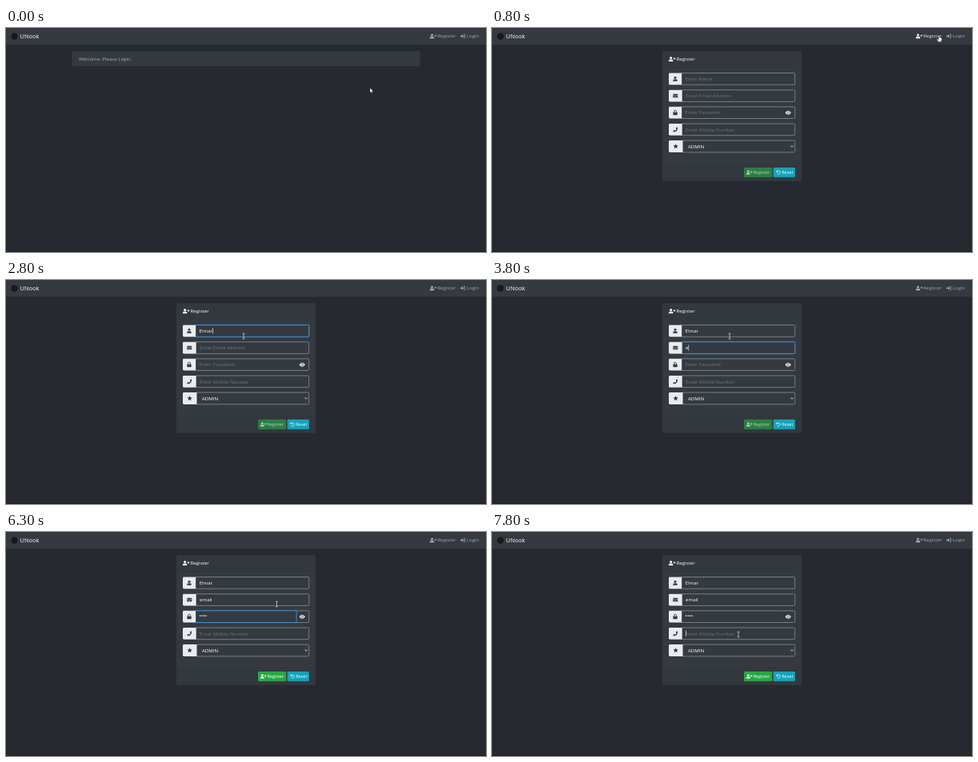
Recreate the animation shown at these times as an HTML page with a canvas. Size 600x281 px, loop 8 s.

```html
<!DOCTYPE html>
<html lang="en">
<head>
<meta charset="utf-8">
<title>Register</title>
<style>
html, body { margin: 0; width: 100%; height: 100%; overflow: hidden; background: #262a30; }
canvas { display: block; width: 600px; height: 281px; }
</style>
</head>
<body>
<canvas id="stage"></canvas>
<script>
const W = 600, H = 281, LOOP = 8000;
const canvas = document.getElementById('stage');
const ctx = canvas.getContext('2d');
const dpr = window.devicePixelRatio || 1;
canvas.width = W * dpr;
canvas.height = H * dpr;

const PANEL = '#343a40', LIGHT = '#e9ecef', MUTED = '#a0a4a8', DARK = '#343a40';

// Each entry changes only the listed parts of the state.
const START = {
  page: 'home', hover: '', cursor: ['arrow', 455, 75],
  name: '', email: '', password: '', focus: '', glow: 0, caret: false, ready: 0
};
const TIMELINE = [
  [300, { cursor: ['hand', 559, 9], hover: 'nav' }],
  [800, { page: 'form' }],
  [1300, { cursor: ['beam', 297, 70.5], hover: '', focus: 'name', glow: 0.5, caret: true }],
  [1500, { glow: 1 }],
  [1800, { name: 'E' }],
  [2000, { name: 'El' }],
  [2300, { name: 'Elm' }],
  [2500, { name: 'Elma' }],
  [2800, { name: 'Elmar' }],
  [3000, { focus: 'email', glow: 0.5 }],
  [3300, { glow: 1 }],
  [3800, { email: 'e' }],
  [4300, { email: 'ema' }],
  [4500, { email: 'email' }],
  [4800, { focus: 'password', glow: 0.5 }],
  [5000, { glow: 1 }],
  [5300, { password: '•', ready: 0.5 }],
  [5500, { password: '••', ready: 1 }],
  [5800, { password: '••••' }],
  [6300, { cursor: ['beam', 338.5, 90.5], caret: false }],
  [6500, { cursor: ['hand', 369, 108] }],
  [6800, { focus: '', glow: 0 }],
  [7500, { cursor: ['hand', 367, 178], hover: 'reset' }],
  [7800, { cursor: ['beam', 308, 128.5], hover: '', focus: 'mobile', caret: true }]
];

const FIELDS = [
  { id: 'name', icon: 'user', hint: 'Enter Name', x: 237, y: 56.5 },
  { id: 'email', icon: 'mail', hint: 'Enter Email Address', x: 237.5, y: 77.7 },
  { id: 'password', icon: 'lock', hint: 'Enter Password', x: 237, y: 98.8 },
  { id: 'mobile', icon: 'phone', hint: 'Enter Mobile Number', x: 237.5, y: 120 }
];

function stateAt(time) {
  return Object.assign({}, START, ...TIMELINE.filter(e => e[0] <= time).map(e => e[1]));
}

function box(x, y, w, h, r, fill, stroke, line = 0.6) {
  ctx.beginPath();
  ctx.roundRect(x, y, w, h, r);
  if (fill) { ctx.fillStyle = fill; ctx.fill(); }
  if (stroke) { ctx.strokeStyle = stroke; ctx.lineWidth = line; ctx.stroke(); }
}

function text(str, x, y, size, color) {
  ctx.font = `${size}px "Open Sans", "Noto Sans", sans-serif`;
  ctx.fillStyle = color;
  ctx.fillText(str, x, y);
  return ctx.measureText(str).width;
}

function poly(points, fill, stroke, line = 0.7) {
  ctx.beginPath();
  points.forEach(([x, y]) => ctx.lineTo(x, y));
  ctx.closePath();
  if (fill) { ctx.fillStyle = fill; ctx.fill(); }
  if (stroke) { ctx.strokeStyle = stroke; ctx.lineWidth = line; ctx.stroke(); }
}

function disc(x, y, r, fill) {
  ctx.beginPath();
  ctx.arc(x, y, r, 0, 7);
  ctx.fillStyle = fill;
  ctx.fill();
}

function path(d, color, line, fill) {
  const p = new Path2D(d);
  if (fill) { ctx.fillStyle = fill; ctx.fill(p); }
  if (line) { ctx.strokeStyle = color; ctx.lineWidth = line; ctx.stroke(p); }
}

// Icons are drawn around their own centre, about six pixels tall.
const icons = {
  user(c) {
    disc(0, -1.5, 1.5, c);
    box(-2.7, 0.4, 5.4, 2.6, [1.5, 1.5, 0.4, 0.4], c);
  },
  userPlus(c) {
    ctx.translate(-1.2, 0);
    icons.user(c);
    path('M3 -.6H5.8M4.4 -2V.8', c, 0.8);
  },
  mail(c) {
    box(-3, -2.3, 6, 4.6, 0.6, c);
    path('M-3 -1.2L0 .9L3 -1.2', LIGHT, 0.6);
  },
  lock(c) {
    box(-2.6, -0.4, 5.2, 3.5, 0.5, c);
    path('M-1.5 0V-1.4A1.5 1.5 0 0 1 1.5 -1.4V0', c, 0.9);
  },
  phone(c) {
    path('M2.8 -2.9L1.2 -2.5L.6 -1L1.4 -.4Q.8 .9 -.4 1.4L-1 .6L-2.5 1.2L-2.9 2.8Q3.2 3.3 2.8 -2.9Z', c, 0, c);
  },
  star(c) {
    poly(Array.from({ length: 10 }, (_, i) => {
      const r = i % 2 ? 1.6 : 3.3, a = i * Math.PI / 5;
      return [Math.sin(a) * r, -Math.cos(a) * r];
    }), c);
  },
  eye(c) {
    path('M-3.6 0Q0 -5 3.6 0Q0 5 -3.6 0Z', c, 0, c);
    disc(0, 0, 1.6, DARK);
    disc(0, 0, 1, c);
  },
  login(c) {
    path('M-3 -.8H-.9V-2.3L1.4 0L-.9 2.3V.8H-3Z', c, 0, c);
    path('M1 -2.1H2.6V2.1H1', c, 0.8);
  },
  undo(c) {
    path('M-1.8 -1.3A2.3 2.3 0 1 1 -1.6 1.7', c, 0.8);
    path('M-2.8 -2.8V-.4H-.4Z', c, 0, c);
  }
};

function icon(kind, x, y, color, scale = 1) {
  ctx.save();
  ctx.translate(x, y);
  ctx.scale(scale, scale);
  icons[kind](color);
  ctx.restore();
}

function drawNav(s) {
  box(0, 0, W, 21, 0, PANEL);
  disc(10.5, 10.5, 4.2, '#17191d');
  text('UNook', 17.5, 13, 7.4, '#ffffff');
  const active = s.hover === 'nav' ? '#e6e7e8' : MUTED;
  icon('userPlus', 533.7, 10.2, active);
  text('Register', 539.3, 12.4, 6.1, active);
  icon('login', 571, 10.2, MUTED);
  text('Login', 575.8, 12.4, 6.1, MUTED);
}

function drawHome() {
  box(82.5, 29, 435, 19, 1.2, PANEL);
  text('Welcome. Please Login.', 91, 41.3, 6.1, '#a9acb0');
}

function drawField(f, s) {
  const focused = s.focus === f.id, glow = focused ? s.glow : 0;
  const value = s[f.id] || '', right = 378.7, height = 14.7;
  const end = f.id === 'password' ? 363 : right;
  const mid = f.y + height / 2;
  box(f.x, f.y, right - f.x, height, [0, 1.4, 1.4, 0], PANEL, '#a3a8ad');
  if (glow) {
    box(f.x, f.y, end - f.x, height, 0.8, null, `rgba(0,123,255,${0.25 * glow})`, 2.4);
    box(f.x, f.y, end - f.x, height, 0.8, PANEL, `rgba(73,151,216,${glow})`, 0.8);
  }
  box(221, f.y, f.x - 221, height, [1.4, 0, 0, 1.4], LIGHT);
  icon(f.icon, (221 + f.x) / 2, mid, DARK);
  const x = f.x + 4.6;
  let width = 0;
  if (value) width = text(value, x, mid + 2.3, f.id === 'password' ? 6.4 : 6.1, '#ffffff');
  else text(f.hint, x, mid + 2.3, 6.1, '#6c757d');
  if (focused && s.caret) {
    ctx.fillStyle = '#ffffff';
    ctx.fillRect(x + width, mid - 3.8, 0.6, 7.4);
  }
  if (f.id === 'password') icon('eye', 370.2, mid, '#ffffff');
}

function drawButton(x, w, kind, label, fill, alpha) {
  ctx.globalAlpha = alpha;
  box(x, 175, w, 12.2, 1.2, fill);
  icon(kind, x + 6.4, 181.1, '#ffffff', 0.9);
  text(label, x + (kind === 'undo' ? 10.6 : 11.4), 183.1, 5.5, '#ffffff');
  ctx.globalAlpha = 1;
}

function drawForm(s) {
  box(213, 29, 174, 163, 1.5, PANEL);
  ctx.fillStyle = 'rgba(0,0,0,.03)';
  ctx.fillRect(213, 29, 174, 20);
  ctx.fillRect(213, 170, 174, 22);
  ctx.fillStyle = 'rgba(0,0,0,.12)';
  ctx.fillRect(213, 49, 174, 0.5);
  ctx.fillRect(213, 170, 174, 0.5);
  icon('userPlus', 224.8, 39, '#ffffff');
  text('Register', 230.6, 41.3, 6.1, '#ffffff');

  FIELDS.forEach(f => drawField(f, s));
  box(238.3, 141.1, 140.4, 14.8, [0, 1.4, 1.4, 0], PANEL, '#a3a8ad');
  box(221, 141.1, 17.3, 14.8, [1.4, 0, 0, 1.4], LIGHT);
  icon('star', 229.6, 148.5, DARK);
  text('ADMIN', 245, 150.8, 6.1, '#ffffff');
  path('M373.6 147.6L375.2 149.3L376.8 147.6', '#ffffff', 0.8);

  drawButton(315, 35.2, 'userPlus', 'Register', '#28a745', 0.65 + 0.35 * s.ready);
  drawButton(351.6, 27.3, 'undo', 'Reset', s.hover === 'reset' ? '#138496' : '#17a2b8', 1);
}

const cursors = {
  arrow() {
    poly([[0, 0], [0, 6.2], [1.4, 5], [2.3, 7], [3.2, 6.6], [2.4, 4.7], [4.2, 4.6]], '#ffffff', '#111111', 0.4);
  },
  hand() {
    path('M-.8 .4Q0 -.6 .7 .4V2.8L3 3.4Q3.6 3.7 3.4 5L2.6 8.4H-1.2L-2.9 5.2Q-2.7 4.2 -1.7 4.8L-.8 5.6Z',
      '#15171a', 0.5, '#ffffff');
  },
  beam() {
    path('M-1.4 -3.3H1.4M0 -3.3V3.3M-1.4 3.3H1.4', '#dfe1e3', 0.7);
  }
};

function drawCursor([kind, x, y]) {
  ctx.save();
  ctx.translate(x, y);
  cursors[kind]();
  ctx.restore();
}

function draw(time) {
  const s = stateAt(time);
  ctx.setTransform(dpr, 0, 0, dpr, 0, 0);
  ctx.fillStyle = '#262a30';
  ctx.fillRect(0, 0, W, H);
  ctx.fillStyle = '#1b1e22';
  ctx.fillRect(0, 280, W, 1);
  drawNav(s);
  if (s.page === 'home') drawHome();
  else drawForm(s);
  drawCursor(s.cursor);
}

const begin = performance.now();
function tick() {
  draw((performance.now() - begin) % LOOP);
  requestAnimationFrame(tick);
}
tick();
</script>
</body>
</html>
```
